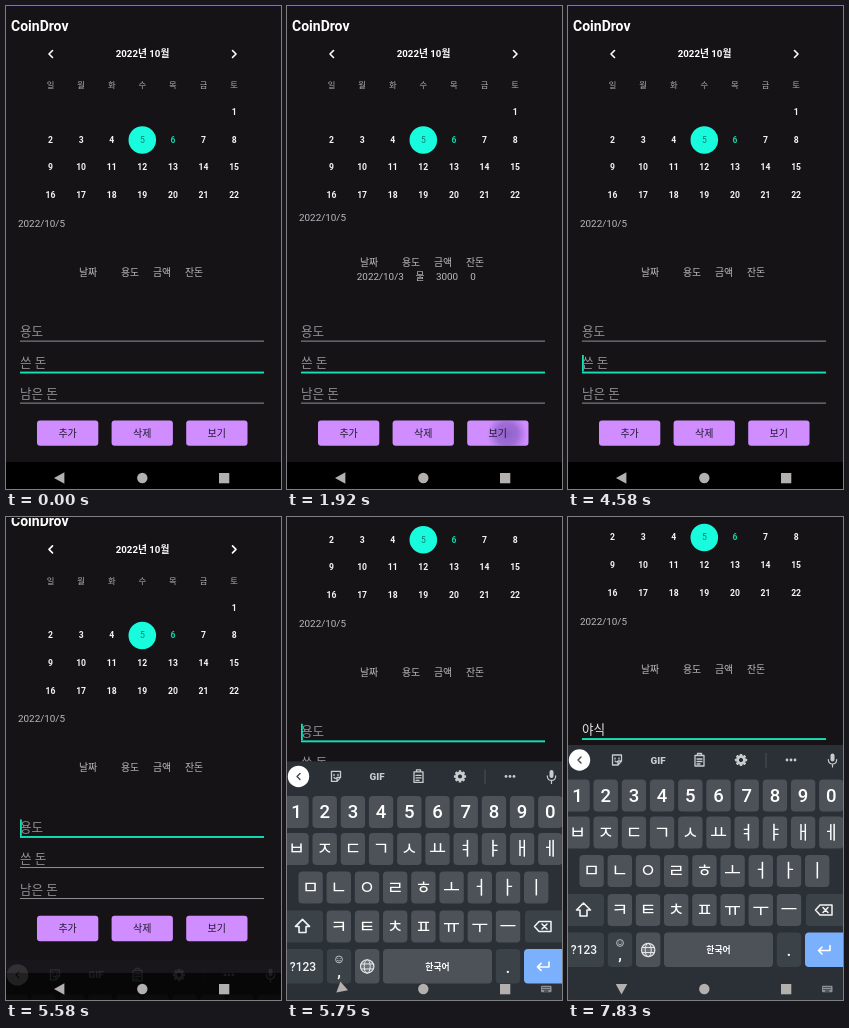
An HTML page for the animation above (8000 ms loop, 275 px wide and 483 px high).

```html
<!DOCTYPE html>
<html lang="ko">
<head>
<meta charset="utf-8">
<style>
html, body { margin: 0; width: 100%; height: 100%; overflow: hidden; background: #161317; }
svg { display: block; width: 100%; height: 100%; }
text { font-family: Roboto, 'Noto Sans CJK KR', 'Noto Sans CJK JP', 'Noto Sans CJK', sans-serif; white-space: pre; }
</style>
</head>
<body>
<svg id="stage" viewBox="0 0 275 483"></svg>
<script>
const LOOP = 8000, PAN = 113.5, LEFT = 14;
const TEAL = '#13e2b8', GREY = '#929094', LIGHT = '#bdbbbe', WHITE = '#f4f4f4', ICON = '#c9cccf';

// ---- markup helpers; cy is the visual middle of a text line
const text = (s, x, cy, size, fill, { anchor = 'middle', weight = 500, id = '' } = {}) =>
  `<text ${id && `id="${id}"`} x="${x}" y="${cy + size * 0.36}" font-size="${size}" fill="${fill}" text-anchor="${anchor}" font-weight="${weight}">${s}</text>`;
const rect = (x, y, w, h, fill, rx = 0, extra = '') =>
  `<rect x="${x}" y="${y}" width="${w}" height="${h}" rx="${rx}" fill="${fill}" ${extra}/>`;
const dot = (x, y, r, fill, extra = '') => `<circle cx="${x}" cy="${y}" r="${r}" fill="${fill}" ${extra}/>`;
const line = (d, color = ICON, w = 1.3) =>
  `<path d="${d}" fill="none" stroke="${color}" stroke-width="${w}" stroke-linejoin="round" stroke-linecap="round"/>`;
const group = (id, body, extra = '') => `<g id="${id}" ${extra}>${body}</g>`;
const start = { anchor: 'start' };

function calendar() {
  const col = i => 44.5 + 30.6 * i;
  let out = line('M46.5 44.5L43 48L46.5 51.5', '#fff', 1.6) + line('M226.5 44.5L230 48L226.5 51.5', '#fff', 1.6);
  out += text('2022년 10월', 136.5, 48, 9.7, '#fff', { weight: 700 });
  [...'일월화수목금토'].forEach((d, i) => out += text(d, col(i), 79.3, 8.3, '#b0aeb1'));
  out += dot(136.3, 134, 13.8, '#18fbdc');
  for (let day = 1; day <= 22; day++) {
    const cell = day + 5, fill = day === 5 ? '#0b7c72' : day === 6 ? '#10d3a6' : WHITE;
    out += text(day, col(cell % 7), 106 + 27.7 * Math.floor(cell / 7), 8.6, fill, { weight: day === 5 ? 400 : 600 });
  }
  return out;
}

function table() {
  const head = ['날짜', '용도', '금액', '잔돈'].map((s, i) => text(s, [82, 124, 156, 188][i], 266.2, 9.9, LIGHT)).join('');
  const row = ['2022/10/3', '물', '3000', '0'].map((s, i) => text(s, [93.3, 133, 160, 186][i], 270.5, 9.9, LIGHT, { weight: 400 })).join('');
  return group('head', head) + group('row', row);
}

function form() {
  const hints = ['용도', '쓴 돈', '남은 돈'];
  let out = hints.map((s, i) =>
    text(s, LEFT, 325.6 + 31 * i, 12.6, GREY, { ...start, id: 'hint' + i }) +
    rect(LEFT, 334.6 + 31 * i, 244, 1, GREY, 0, `id="rule${i}"`)).join('');
  out += text('', LEFT, 325.6, 12.6, '#e8e8e8', { ...start, id: 'typed' });
  out += rect(LEFT, 333, 12, 0.9, '#e0e0e0', 0, 'id="compose"');
  out += rect(LEFT, 318, 1.8, 16.5, TEAL, 0, 'id="caret"');
  ['추가', '삭제', '보기'].forEach((s, i) => {
    const x = 31 + 74.6 * i;
    out += rect(x, 414.4, 61.3, 25.4, '#cf8dff', 3);
    if (i === 2) out += '<g clip-path="url(#button)"><circle id="ripple" cx="220" cy="428" fill="url(#ink)"/></g>';
    out += text(s, x + 30.6, 427, 10, '#21162c');
  });
  return out;
}

function toolbar() {
  const gear = Array.from({ length: 8 }, (_, i) =>
    rect(171.7, 236.9, 2.6, 4, ICON, 0.5, `transform="rotate(${45 * i} 173 243)"`)).join('');
  return line('M44.5 238H53.5V244L50 248H44.5ZM50 248V244H53.5M47 241V242M51 241V242M47 244Q48 245.5 49.5 244.5') +
    text('GIF', 90, 243, 9.8, ICON, { weight: 900 }) +
    line('M127 238.5H136V249H127ZM129.5 238V236.5H133.5V238M129 242H134M129 244.5H134M129 247H132') +
    gear + dot(173, 243, 3.5, 'none', `stroke="${ICON}" stroke-width="2.6"`) +
    rect(197.5, 236, 1, 15, '#4a5157') +
    [219, 223, 227].map(x => dot(x, 243, 1.4, ICON)).join('');
}

function keys() {
  const KEY = '#4c5258', DARK = '#3b4248', step = 28.2;
  const rows = [['1234567890', 9.5, 278.6], ['ㅂㅈㄷㄱㅅㅛㅕㅑㅐㅔ', 9.5, 315.6], ['ㅁㄴㅇㄹㅎㅗㅓㅏㅣ', 23.6, 354], ['ㅋㅌㅊㅍㅠㅜㅡ', 51.8, 393]];
  let out = '';
  for (const [chars, x0, cy] of rows)
    [...chars].forEach((c, i) => {
      const x = x0 + step * i;
      out += rect(x - 12.2, cy - 16, 24.4, 32, KEY, 4) + text(c, x, cy - 0.4, 18.5, '#fff');
    });
  out += rect(-4, 377, 40, 32, DARK, 4) + line('M15.5 386L22.5 393H19V399H12V393H8.5Z', WHITE, 1.6);
  out += rect(238, 377, 41, 32, DARK, 4) + line('M252 388H264V398H252L247.5 393ZM255 390.5L260 395.5M260 390.5L255 395.5', WHITE, 1.5);
  out += rect(-4, 415.5, 40, 34.5, DARK, 4) + text('?123', 16, 433, 12, WHITE);
  out += rect(39.8, 415.5, 24.4, 34.5, DARK, 4) + text(',', 52, 438, 15, WHITE, { weight: 700 }) +
    dot(52, 426, 3.4, 'none', `stroke="${ICON}" stroke-width=".9"`) + line('M50.4 427Q52 428.7 53.6 427M50.8 425V425.1M53.2 425V425.1', ICON, 0.8);
  out += rect(68, 415.5, 24.4, 34.5, KEY, 4) + dot(80.2, 433, 6.7, '#6b7177', 'stroke="#e4e6e8" stroke-width="1.2"') +
    '<ellipse cx="80.2" cy="433" rx="3" ry="6.7" fill="none" stroke="#e4e6e8"/>' + line('M74.3 430.5H86.1M74.3 435.5H86.1', '#e4e6e8', 1);
  out += rect(96, 415.5, 109, 34.5, KEY, 4) + text('한국어', 150.5, 433, 8.8, '#fff', { weight: 700 });
  out += rect(208.8, 415.5, 24.4, 34.5, DARK, 4) + text('.', 221, 433.8, 15, WHITE, { weight: 700 });
  out += rect(237, 415.5, 42, 34.5, '#7bb0fc', 4) + line('M262 428.5V433.5H250.5M254 430L250.5 433.5L254 437', '#fff', 1.6);
  return out;
}

function keyboard() {
  const strip = [56, 136, 214].map((x, i) => text('', x, 243, 12, WHITE, { id: 'word' + i })).join('') +
    rect(93.5, 236, 1, 15, '#4a5157') + rect(177, 236, 1, 15, '#4a5157');
  return rect(0, 228, 275, 255, '#2a3036') + keys() + group('tools', toolbar()) + group('strip', strip) +
    dot(11.5, 243, 10.7, '#fff') + group('chevron', line('M13 240L10 243L13 246', '#41474d', 1.4)) +
    rect(262.5, 236.5, 4, 8, ICON, 2) + line('M260.3 242.5Q260.5 247 264.5 247T268.7 242.5M264.5 247V250', ICON, 1.2);
}

function navIcons() {
  const hints = [0, 1, 2, 3].map(i => rect(255.5 + 2 * i, 470, 1, 1, '#15191c') + rect(255.5 + 2 * i, 472, 1, 1, '#15191c')).join('');
  return '<path id="back" d="M48 472L58.4 466.2V477.8Z" fill="#b3b0ae"/>' + dot(136.3, 472, 5.2, '#b3b0ae') +
    rect(213, 467, 10.3, 10.3, '#b3b0ae') +
    group('picker', rect(254, 468.7, 10.5, 6.6, '#8b9094', 1) + hints + rect(257, 473.6, 4.5, 0.9, '#15191c'));
}

const stage = document.getElementById('stage');
stage.innerHTML =
  `<defs><clipPath id="button"><rect x="180.2" y="414.4" width="61.3" height="25.4" rx="3"/></clipPath>
  <radialGradient id="ink"><stop offset="0" stop-color="#5b3c9c"/><stop offset=".55" stop-color="#6a48a8" stop-opacity=".85"/><stop offset="1" stop-color="#7d55bb" stop-opacity="0"/></radialGradient></defs>` +
  rect(0, 0, 275, 483, '#161317') +
  group('page', text('CoinDrov', 5, 20, 14, '#fff', { ...start, weight: 600 }) + calendar() +
    text('2022/10/5', 12, 217.5, 9.9, LIGHT, { ...start, id: 'date', weight: 400 }) + table() + form()) +
  rect(0, 0, 275, 1, '#150d30') + rect(0, 456, 275, 27, '#000', 0, 'id="nav"') +
  group('keyboard', keyboard()) + navIcons();

const $ = {};
stage.querySelectorAll('[id]').forEach(el => $[el.id] = el);

// ---- timeline
const FOCUS = 5500, COMMIT = 7330;
const typing = [[FOCUS, ''], [6250, 'ㅇ'], [6420, '야'], [6920, '얏'], [7090, '야시'], [7250, '야식'], [COMMIT, '야식 ']];
const words = [[6580, '야 이 아'], [7000, '얏 약 야시'], [7170, '야시 야식 야시장'], [7300, '야식 야식이 야식은']];

const clamp = v => Math.min(1, Math.max(0, v));
const span = (t, from, len) => clamp((t - from) / len);
const latest = (list, t) => list.filter(e => e[0] <= t).pop();
const set = (el, attrs) => { for (const k in attrs) el.setAttribute(k, attrs[k]); };
const show = (el, on) => set(el, { visibility: on ? 'visible' : 'hidden' });
const shift = (el, dy) => set(el, { transform: `translate(0 ${dy})` });

function draw(t) {
  const focus = t < FOCUS ? 1 : 0;
  const [since, typed] = latest(typing, t) || [420, ''];

  const listed = t >= 1900 && t < 4500;
  show($.row, listed);
  shift($.head, listed ? -10 : 0);
  shift($.date, listed ? -6 : 0);

  const press = span(t, 1830, 840);
  set($.ripple, { r: 12 + 75 * press, opacity: t < 1830 ? 0 : 0.62 * (1 - press) });

  for (let i = 0; i < 3; i++) {
    const on = i === focus;
    set($['rule' + i], { y: 334.6 + 31 * i, height: on ? 1.9 : 1, fill: on ? TEAL : GREY });
  }
  show($.hint0, !typed);
  $.typed.textContent = typed;
  const width = typed ? $.typed.getComputedTextLength() : 0;
  show($.compose, typed && t < COMMIT);
  set($.compose, { width });
  set($.caret, { x: LEFT + width, y: 318 + 31 * focus });
  show($.caret, t >= since && Math.floor((t - since) / 500) % 2 === 0);

  const pan = 1 - (1 - span(t, 5569, 250)) ** 3;
  shift($.page, -PAN * pan);

  const rise = span(t, 5560, 256);
  shift($.keyboard, 255 * (1 - rise) ** 2);
  set($.keyboard, { opacity: clamp(rise * 1.5) });
  set($.nav, { opacity: 1 - rise });
  set($.picker, { opacity: rise > 0.7 ? 1 : 0 });
  set($.back, { transform: `rotate(${-90 * span(t, 5660, 200)} 53.5 472)` });

  const suggest = t >= 6580 && t < 7450;
  show($.strip, suggest);
  show($.tools, !suggest);
  set($.chevron, { transform: suggest ? 'rotate(180 11.5 243)' : '' });
  if (suggest) latest(words, t)[1].split(' ').forEach((w, i) => $['word' + i].textContent = w);
}

const origin = performance.now();
function tick() {
  draw((performance.now() - origin) % LOOP);
  requestAnimationFrame(tick);
}
tick();
</script>
</body>
</html>
```
